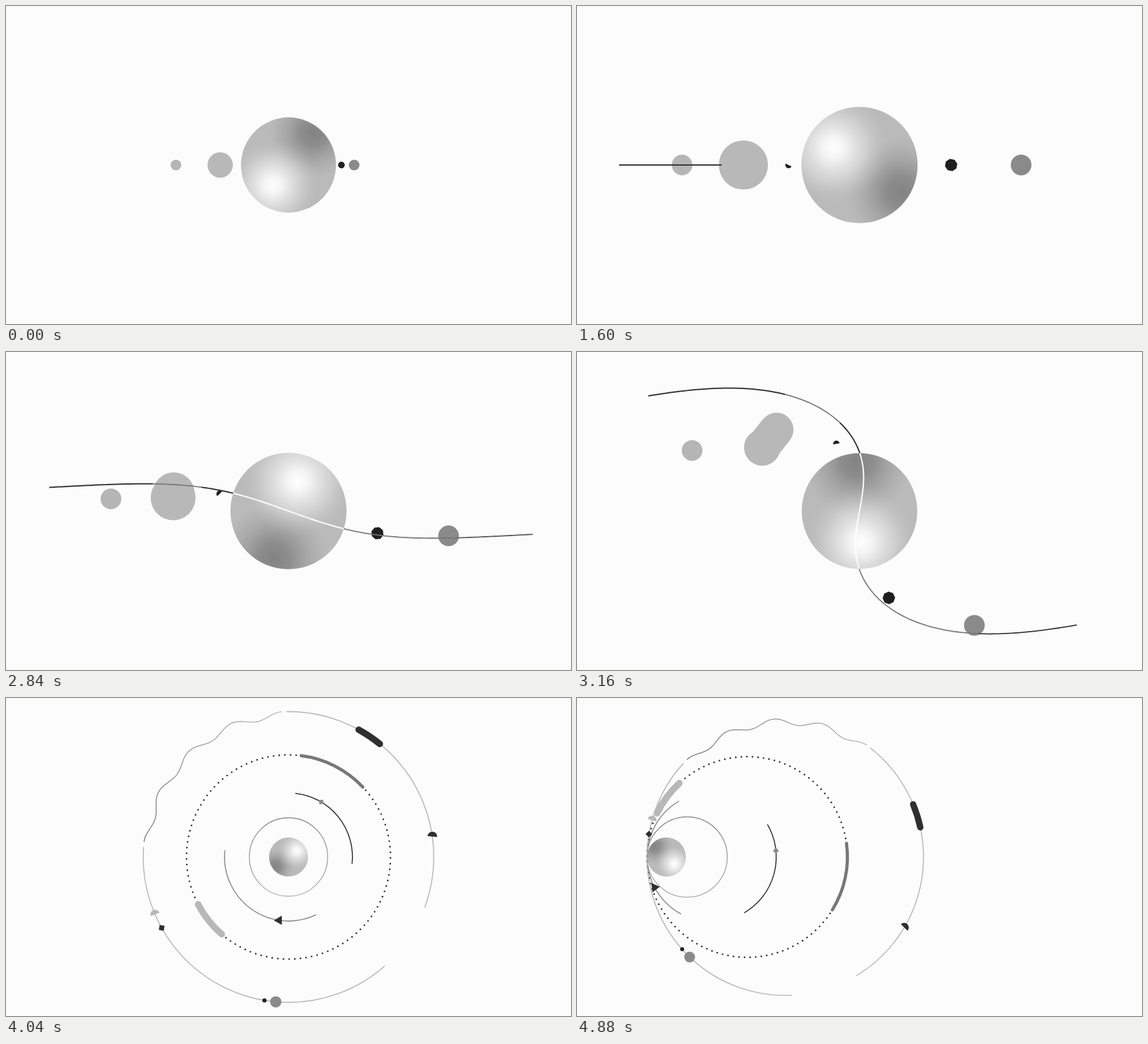
Animation of 900x506 px, one loop 4.92 s. Source, as an HTML page with a canvas:

```html
<!DOCTYPE html>
<html lang="en">
<head>
<meta charset="utf-8">
<title>Orbits</title>
<style>
  html, body { margin: 0; width: 100%; height: 100%; overflow: hidden; background: #fcfcfc; }
  canvas { display: block; width: 900px; height: 506px; }
</style>
</head>
<body>
<canvas id="stage" width="900" height="506"></canvas>
<script>
const LOOP = 4920, CX = 450, CY = 253, ORBITS_AT = 3390;
const DARK = '#2f2f2f', BLACK = '#1f1f20', MID = '#777', GRAY = '#8a8a8a', LIGHT = '#b8b8b8';
const ctx = document.getElementById('stage').getContext('2d');
const TAU = Math.PI * 2;
const rad = deg => deg * Math.PI / 180;
const settle = (t, tau) => 1 - Math.exp(-t / tau);

// Smooth monotone interpolation through [time, value] keys.
function track(keys, t) {
  const last = keys.length - 1;
  if (t <= keys[0][0]) return keys[0][1];
  if (t >= keys[last][0]) return keys[last][1];
  let i = 0;
  while (t >= keys[i + 1][0]) i++;
  const slope = k => (keys[k + 1][1] - keys[k][1]) / (keys[k + 1][0] - keys[k][0]);
  const tangent = k => {
    if (k === 0 || k === last) return 0;
    const a = slope(k - 1), b = slope(k);
    return a * b <= 0 ? 0 : 2 * a * b / (a + b);
  };
  const [t0, v0] = keys[i], [t1, v1] = keys[i + 1];
  const h = t1 - t0, u = (t - t0) / h, w = 1 - u;
  return v0 * (1 + 2 * u) * w * w + v1 * u * u * (3 - 2 * u)
    + h * u * w * (w * tangent(i) - u * tangent(i + 1));
}

const lightKeys = [[-700, 88], [0, 128], [720, 170], [2320, 247.5], [2760, 270], [3160, 446.5],
  [3560, 650], [4040, 683], [4880, 762], [5600, 830]];
const twistKeys = [[2640, 0], [3160, 100], [3400, 230]];
const shrinkKeys = [[2900, 1], [3160, .995], [3420, .335]];
const halfSpin = [[0, -30], [720, 35], [2320, 180], [3160, 260], [3400, 300]];
const slideKeys = [[4590, 0], [4735, .5], [4880, 1]];

const nudge = (t, pass, amount) =>
  track([[pass, 0], [pass + 250, amount], [2400, amount], [2850, 0]], t);

function disc(x, y, r, color) {
  ctx.fillStyle = color;
  ctx.beginPath();
  ctx.arc(x, y, Math.max(r, 0), 0, TAU);
  ctx.fill();
}

function half(x, y, r, bulge, color) {
  ctx.fillStyle = color;
  ctx.beginPath();
  ctx.arc(x, y, Math.max(r, 0), rad(bulge - 90), rad(bulge + 90));
  ctx.fill();
}

function polygon(x, y, r, sides, turn, color) {
  ctx.fillStyle = color;
  ctx.beginPath();
  for (let i = 0; i < sides; i++) {
    const a = rad(turn + i * 360 / sides);
    ctx.lineTo(x + r * Math.cos(a), y + r * Math.sin(a));
  }
  ctx.fill();
}

function arc(x, r, from, to, color, width, cap = 'butt') {
  ctx.strokeStyle = color;
  ctx.lineWidth = width;
  ctx.lineCap = cap;
  ctx.beginPath();
  ctx.arc(x, CY, r, rad(from), rad(to));
  ctx.stroke();
}

function sphere(x, r, light) {
  const dx = Math.cos(rad(light)) * r, dy = Math.sin(rad(light)) * r;
  disc(x, CY, r, '#bababa');
  const shade = ctx.createRadialGradient(x - dx * .86, CY - dy * .86, 0, x - dx * .86, CY - dy * .86, r * .95);
  shade.addColorStop(0, 'rgba(130,130,130,1)');
  shade.addColorStop(.3, 'rgba(134,134,134,.85)');
  shade.addColorStop(1, 'rgba(160,160,160,0)');
  disc(x, CY, r, shade);
  const hx = x + dx * .54, hy = CY + dy * .54;
  const glow = ctx.createRadialGradient(hx, hy, 0, hx, hy, r * .95);
  glow.addColorStop(0, 'rgba(255,255,255,1)');
  glow.addColorStop(.2, 'rgba(250,250,250,.9)');
  glow.addColorStop(.6, 'rgba(235,235,235,.45)');
  glow.addColorStop(1, 'rgba(200,200,200,0)');
  disc(x, CY, r, glow);
}

// Point at signed distance s on the twisted axis.
function axisPoint(s, twist) {
  const a = rad(twist / (1 + Math.pow(Math.abs(s) / 251.5, 2.19)));
  return [CX + s * Math.cos(a), CY + s * Math.sin(a)];
}

function axis(t, twist, sx, r) {
  const p = Math.min(Math.max((t - 1160) / 1450, 0), 1);
  const trim = track([[3200, 391], [3400, 30]], t);
  const head = Math.min(-383 + 774 * (1 - Math.cos(Math.PI * p)) / 2, trim);
  const tail = Math.max(-383, -trim);
  const tip = Math.round(track([[2700, 119], [3000, 50]], t));
  const parts = [
    [-383, -220, DARK, 2], [-220, -144, MID, 1.8], [-144, sx - r, DARK, 2],
    [sx - r, sx + r, '#fff', 2], [sx + r, 272, MID, 1.8], [272, 391, `rgb(${tip},${tip},${tip})`, 1.8]
  ];
  ctx.lineCap = 'butt';
  for (const [a, b, color, width] of parts) {
    const from = Math.max(a, tail), to = Math.min(b, head);
    if (to <= from) continue;
    ctx.strokeStyle = color;
    ctx.lineWidth = width;
    ctx.beginPath();
    const n = Math.ceil((to - from) / 4);
    for (let i = 0; i <= n; i++) ctx.lineTo(...axisPoint(from + (to - from) * i / n, twist));
    ctx.stroke();
  }
}

function planets(t, light) {
  const twist = track(twistKeys, t);
  const size = track([[3200, 1], [3400, 0]], t);
  const place = (from, to, tau, share) => {
    const d = from + (to - from) * settle(t, tau), a = rad(twist * share);
    return [CX + d * Math.cos(a), CY + d * Math.sin(a)];
  };
  const grow = (from, to, tau) => (from + (to - from) * settle(t, tau)) * size;

  disc(...place(-179, -283.5, 335, .198), grow(8.5, 16.5, 335), '#b5b5b5');

  const big = -185 + nudge(t, 1600, 3);
  const front = place(-108.5, big, 225, .443), back = place(-108.5, big, 225, .33);
  const bigR = grow(19.5, 38, 225) * track([[2640, 1], [3160, .74]], t);
  disc(...front, bigR * .96, LIGHT);
  disc(...back, bigR * 1.03, LIGHT);
  ctx.strokeStyle = LIGHT;
  ctx.lineWidth = bigR * 1.94;
  ctx.lineCap = 'butt';
  ctx.beginPath();
  ctx.moveTo(...front);
  ctx.lineTo(...back);
  ctx.stroke();

  half(...place(-70, -113 + nudge(t, 1740, 8), 180, .708), 5.2 * size, track(halfSpin, t), BLACK);
  polygon(...place(84, 146 + nudge(t, 2010, 8), 220, .711), grow(5.5, 10, 200), 8, light, BLACK);
  disc(...place(104, 258 + nudge(t, 2060, 18), 285, .447), grow(8.5, 16.5, 285), GRAY);

  const r = (75.5 + 17 * settle(t, 130)) * track(shrinkKeys, t);
  const sx = nudge(t, 1770, 12.5);
  sphere(CX + sx, r, light);
  axis(t, twist, sx, r);
}

function wave(x, r, from, to) {
  const fade = ctx.createLinearGradient(x + r * Math.cos(rad(from)), CY + r * Math.sin(rad(from)),
    x + r * Math.cos(rad(to)), CY + r * Math.sin(rad(to)));
  fade.addColorStop(0, MID);
  fade.addColorStop(1, LIGHT);
  ctx.strokeStyle = fade;
  ctx.lineWidth = 1.4;
  ctx.beginPath();
  for (let i = 0; i <= 120; i++) {
    const u = i / 120, a = rad(from + (to - from) * u);
    const d = r * (1 + .0225 * (Math.cos(u * 4 * TAU) - 1));
    ctx.lineTo(x + d * Math.cos(a), CY + d * Math.sin(a));
  }
  ctx.stroke();
}

function orbits(t, light) {
  const e = t - 3560;
  const decay = (69 * Math.exp(-e / 270) + 3 * Math.exp(-e / 60)) / 72;
  const slide = track(slideKeys, t);
  const centre = r => CX + (111.5 + r - CX) * slide;
  const turn = (speed, boost) => speed * e + boost * (1 - decay);
  const on = (x, r, deg) => [x + r * Math.cos(rad(deg)), CY + r * Math.sin(rad(deg))];

  sphere(centre(31), 92.5 * track(shrinkKeys, t), light);

  const ringR = 64 - 10 * decay, ringX = centre(ringR);
  const fade = ctx.createLinearGradient(0, CY - ringR, 0, CY + ringR);
  fade.addColorStop(0, MID);
  fade.addColorStop(1, '#aaa');
  arc(ringX, ringR, 0, 360, fade, 1.2);

  const inR = 103 - 7 * decay, inX = centre(inR), inA = turn(.0606, 17.8);
  arc(inX, inR, inA - 128, inA - 38, DARK, 1.6);
  arc(inX, inR, inA + 20.5, inA + 142, GRAY, 1.6);
  polygon(...on(inX, inR, inA - 103.3), 4.8, 4, inA - 97, GRAY);
  polygon(...on(inX, inR, inA + 54.3), 8.5, 3, inA + 135, DARK);

  const dotR = 159.5 + 18.5 * decay, dotX = centre(dotR), dotA = turn(.0901, -4.5);
  for (const [start, count] of [[-80.3, 54], [117.1, 38]])
    for (let i = 0; i < count; i++)
      disc(...on(dotX, dotR, dotA + start + i * 3.18), 1.35, DARK);
  arc(dotX, dotR, dotA - 122.4, dotA - 82.8, MID, 5, 'round');
  arc(dotX, dotR, dotA + 91.3, dotA + 112.8, LIGHT, 10.5, 'round');

  const outR = 219.7 + 72.3 * decay, outX = centre(outR), outA = turn(.0437, 13);
  const k = outR / 231, at = deg => on(outX, outR, outA + deg);
  arc(outX, outR, outA - 122.7, outA - 11.6, LIGHT, 1.6);
  arc(outX, outR, outA + 16.6, outA + 152, LIGHT, 1.6);
  wave(outX, outR, outA + 154, outA + 235.5);
  arc(outX, outR, outA - 93, outA - 83, DARK, 10.5 * k, 'round');
  half(...at(-40), 7.7 * k, outA - 116, DARK);
  half(...at(124.8), 7.5 * k, outA + 217.5, LIGHT);
  polygon(...at(118.9), 5.6 * k, 4, outA + 23, DARK);
  disc(...at(67.6), 3.3 * k, BLACK);
  disc(...at(63.1), 9 * k, GRAY);
}

function draw() {
  const t = performance.now() % LOOP;
  const light = track(lightKeys, t);
  ctx.fillStyle = '#fcfcfc';
  ctx.fillRect(0, 0, 900, 506);
  (t < ORBITS_AT ? planets : orbits)(t, light);
  requestAnimationFrame(draw);
}
draw();
</script>
</body>
</html>
```
